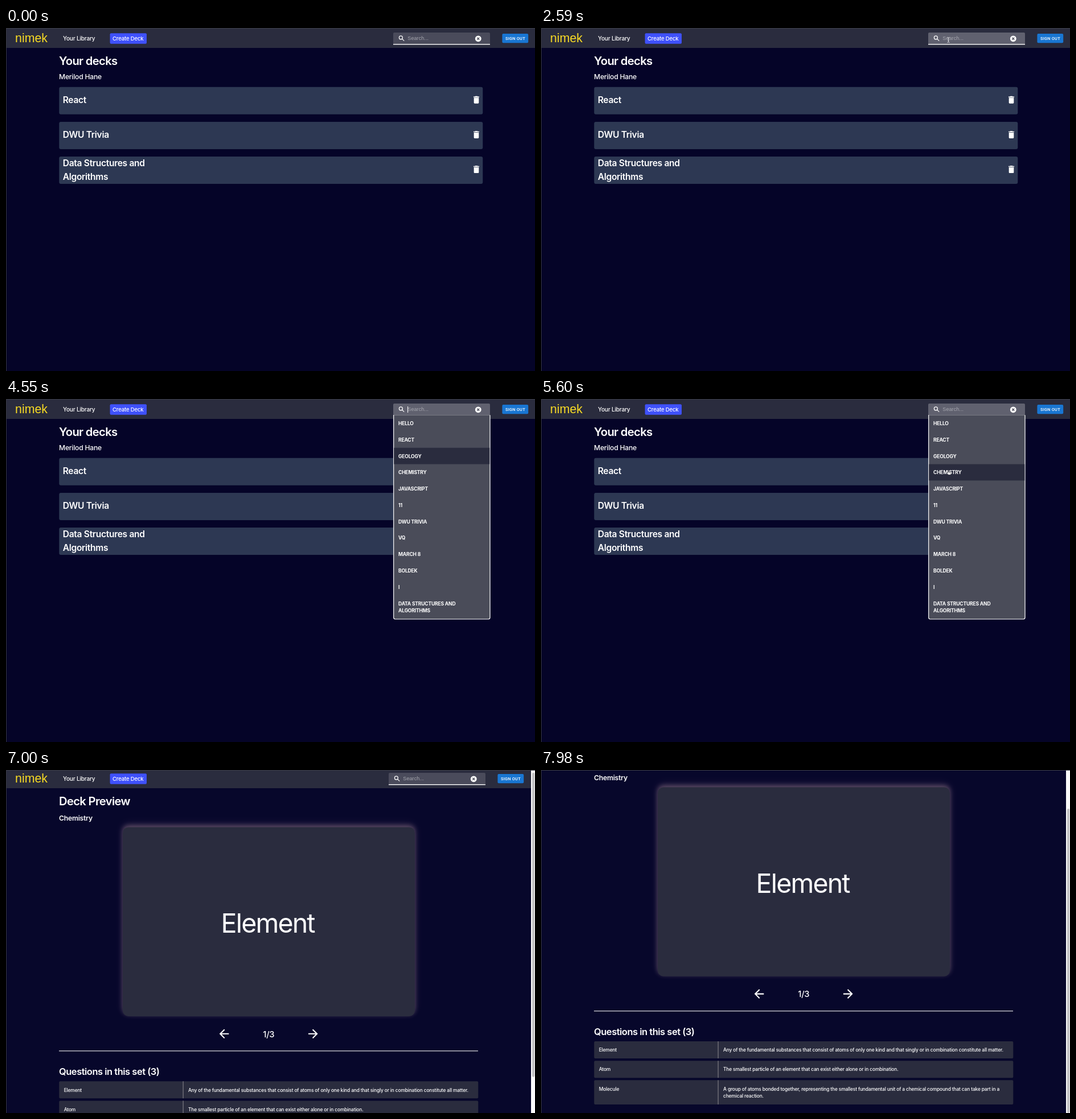
An HTML page that plays this animation: 929 by 603 pixels, repeating every 8 s.

```html
<!DOCTYPE html>
<html lang="en">
<head>
<meta charset="utf-8">
<title>Flashcard decks</title>
<style>
  html, body { margin: 0; width: 100%; height: 100%; overflow: hidden; background: #050428; }
  svg { display: block; width: 100vw; height: 100vh; }
  text {
    font-family: Inter, "Open Sans", sans-serif;
    font-optical-sizing: none;
    letter-spacing: -.02em;
    fill: #fff;
    white-space: pre;
  }
  .title { font-size: 20.3px; font-weight: 600; letter-spacing: -.035em; }
  .sub { font-size: 12.2px; font-weight: 500; }
  .name { font-size: 12.2px; font-weight: 600; }
  .deck { font-size: 15.6px; font-weight: 600; letter-spacing: -.02em; }
  .set { font-size: 16.5px; font-weight: 600; letter-spacing: -.03em; }
  .cell { font-size: 8.44px; font-weight: 500; }
  .item { font-size: 8.55px; font-weight: 700; }
  .face { font-size: 46.6px; letter-spacing: -.04em; }
  .count { font-size: 14.8px; font-weight: 500; text-anchor: middle; }
  .nav { font-size: 10.1px; font-weight: 500; }
  .create { font-size: 9.6px; font-weight: 500; }
  .hint { font-family: "Liberation Sans", Arial, sans-serif; font-size: 9px; letter-spacing: .01em; fill: #a6a7af; }
  .brand { font-family: "Liberation Sans", Arial, sans-serif; font-size: 21.4px; letter-spacing: 0; fill: #f9dc24; }
  .out { font-family: Roboto, sans-serif; font-size: 7.4px; font-weight: 500; letter-spacing: .03em; }
</style>
</head>
<body>
<svg id="stage" viewBox="0 0 929 603" preserveAspectRatio="none">
  <defs>
    <filter id="near" x="-10%" y="-10%" width="120%" height="120%"><feGaussianBlur stdDeviation="4"/></filter>
    <filter id="far" x="-10%" y="-15%" width="120%" height="130%"><feGaussianBlur stdDeviation="8"/></filter>
  </defs>
</svg>
<script>
const LOOP = 8000;
const PANEL = '#2a2c3e';
const stage = document.getElementById('stage');

const rect = (x, y, w, h, fill, r = 0, more = '') =>
  `<rect x="${x}" y="${y}" width="${w}" height="${h}" rx="${r}" fill="${fill}" ${more}/>`;
const label = (x, y, cls, str) => `<text x="${x}" y="${y}" class="${cls}">${str}</text>`;
const icon = (cx, cy, scale, d) =>
  `<path transform="translate(${cx} ${cy}) scale(${scale}) translate(-12 -12)" fill="#fff" d="${d}"/>`;
const group = (id, body) => `<g id="${id}">${body}</g>`;

const TRASH = 'M6 19c0 1.1.9 2 2 2h8c1.1 0 2-.9 2-2V7H6v12zM19 4h-3.5l-1-1h-5l-1 1H5v2h14V4z';
const BACK = 'M20 11H7.83l5.59-5.59L12 4l-8 8 8 8 1.41-1.41L7.83 13H20v-2z';
const NEXT = 'M12 4l-1.41 1.41L16.17 11H4v2h12.17l-5.58 5.59L12 20l8-8z';

const header = () => rect(0, 0, 929, 35, PANEL)
  + label(16, 25, 'brand', 'nimek')
  + label(100, 22, 'nav', 'Your Library')
  + rect(182.6, 9.2, 64.4, 18.6, '#3f51fb', 2)
  + label(187, 21.7, 'create', 'Create Deck')
  + group('tools',
      rect(680, 8, 170, 21, '#fff', 2, 'id="field"')
    + rect(680, 28, 170, 1.4, '#fff')
    + '<g fill="none" stroke="#fff" stroke-width="1.2"><circle cx="693.4" cy="16.9" r="3"/><path d="M695.6 19.1l3.6 3.6"/></g>'
    + label(705.3, 21.2, 'hint', 'Search...')
    + '<circle cx="829.3" cy="18.8" r="5.4" fill="#fff"/>'
    + '<path d="M827.3 16.8l4 4m0-4l-4 4" stroke="#4b4c5b" stroke-width="1.3"/>'
    + rect(871.4, 10, 45.8, 16.2, '#1976d2', 2)
    + label(877, 20.6, 'out', 'SIGN OUT'));

const library = () => {
  const decks = [['React'], ['DWU Trivia'], ['Data Structures and', 'Algorithms']];
  return label(93, 65.3, 'title', 'Your decks')
    + label(93, 89.6, 'sub', 'Merilod Hane')
    + decks.map((lines, i) => {
        const y = 103.7 + 61.2 * i;
        const first = lines.length > 1 ? 16.8 : 28.3;
        return rect(93.3, y, 744, 48, '#2d3853', 3)
          + lines.map((s, k) => label(99.7, y + first + 24 * k, 'deck', s)).join('')
          + icon(826, y + 22.5, .72, TRASH);
      }).join('');
};

const card = (x, y) =>
    rect(x, y - 6, 513, 332, '#8a6a90', 10, 'opacity=".16" filter="url(#far)"')
  + rect(x, y - 3, 513, 332, '#b3909a', 10, 'opacity=".48" filter="url(#near)"')
  + rect(x, y, 513, 332.5, PANEL, 10);

const controls = (cx, y, count) =>
    icon(cx - 78.3, y, 1.04, BACK)
  + icon(cx + 78, y, 1.04, NEXT)
  + label(cx, y + 5.7, 'count', count);

const loading = () => label(93, 65.3, 'title', 'Deck Preview')
  + '<path id="spinner" d="M8 -1A8 8 0 1 0 2 7.7" fill="none" stroke="#fff" stroke-width="2"/>'
  + card(209.3, 96.3)
  + controls(465.4, 458.8, '1/0')
  + rect(93, 488.4, 744, 1.3, '#cfcfd4')
  + label(93, 530.4, 'set', 'Questions in this set (0)')
  + label(93.3, 548, 'cell', '0');

const preview = () => {
  const rows = [
    [550.2, 30, 'Element', 'Any of the fundamental substances that consist of atoms of only one kind and that singly or in combination constitute all matter.'],
    [584.4, 30, 'Atom', 'The smallest particle of an element that can exist either alone or in combination.'],
    [618.5, 42.7, 'Molecule', 'A group of atoms bonded together, representing the smallest fundamental unit of a chemical compound that can take part in a', 'chemical reaction.']
  ];
  return label(93, 65.3, 'title', 'Deck Preview')
    + label(93, 91.6, 'name', 'Chemistry')
    + card(205, 103.4)
    + label(377.6, 289, 'face', 'Element')
    + controls(461.3, 466.8, '1/3')
    + rect(93, 496.2, 736, 1.3, '#cfcfd4')
    + label(93, 538.8, 'set', 'Questions in this set (3)')
    + rows.map(([y, h, term, ...lines]) => rect(93.3, y, 736, h, PANEL, 2)
        + rect(310.6, y, 1, h, '#8f8c90')
        + label(101.7, y + 18.3, 'cell', term)
        + lines.map((s, k) => label(320, y + 18.3 + 12.8 * k, 'cell', s)).join('')).join('');
};

const PITCH = 28.78;
const menu = () => {
  const items = ['HELLO', 'REACT', 'GEOLOGY', 'CHEMISTRY', 'JAVASCRIPT', '11', 'DWU TRIVIA',
    'VQ', 'MARCH 8', 'BOLDEK', 'I', 'DATA STRUCTURES AND'];
  return '<path d="M680.7 28.3V384q0 3 3 3H847q3 0 3-3V28.3" fill="#4a4c59" stroke="#fff" stroke-width="1.2"/>'
    + rect(681.3, 0, 168, PITCH, PANEL, 0, 'id="hover"')
    + items.map((s, i) => label(689, 46 + PITCH * i, 'item', s)).join('')
    + label(689, 375.2, 'item', 'ALGORITHMS');
};

stage.insertAdjacentHTML('beforeend',
    rect(0, 0, 929, 603, '#050428', 0, 'id="back"')
  + group('page', header() + group('library', library()) + group('loading', loading()) + group('preview', preview()))
  + group('menu', menu())
  + rect(705.1, 13, 1, 11, '#fff', 0, 'id="caret"')
  + group('bar', rect(922, 1, 7, 602, '#fafafa') + rect(924, 0, 4.2, 535, '#c1c1c3', 2.1, 'id="thumb"'))
  + '<path id="beam" d="M713.4 16.4q2.1 0 2.1 1.6v6q0 1.6-2.1 1.6M717.6 16.4q-2.1 0-2.1 1.6v6q0 1.6 2.1 1.6M714.4 22.2h2.2" fill="none" stroke="#e2e2e6" stroke-width=".8"/>'
  + '<path id="hand" d="M2.6 .8q.9-.6 1.4.3v2.3l3.3.6q1 .3.8 1.4L7.5 8.3H3.4L.8 5.4q.1-1.1 1.7-.4z" fill="#fff" stroke="#15151f" stroke-width=".6"/>'
  + rect(0, 0, 929, 1, '#3d3f48') + rect(0, 0, 1, 603, '#34353f'));

const el = Object.fromEntries([...stage.querySelectorAll('[id]')].map(n => [n.id, n]));
const show = (node, on) => node.setAttribute('display', on ? 'inline' : 'none');
const within = (t, ...spans) => spans.some(([a, b]) => t >= a && t < b);

// Latest value whose start time has passed.
const stepped = (t, steps) => steps.reduce((v, [at, value]) => t >= at ? value : v, 0);

const OPENED = 5740, LOADED = 5880;

function render(t) {
  const loaded = t >= LOADED;
  const scroll = stepped(t, [[7000, 3], [7070, 21], [7140, 43.6], [7210, 63], [7280, 73.2]]);

  show(el.library, t < OPENED);
  show(el.loading, t >= OPENED && !loaded);
  show(el.preview, loaded);
  show(el.bar, loaded);
  el.back.setAttribute('fill', loaded ? '#07072b' : '#050428');
  el.page.setAttribute('transform', `translate(0 ${-scroll})`);
  el.tools.setAttribute('transform', `translate(${loaded ? -8 : 0} 0)`);
  el.thumb.setAttribute('y', 2 + scroll * .9);
  el.spinner.setAttribute('transform', `translate(102 88) rotate(${(t - OPENED) * 360 / 1400})`);

  el.field.setAttribute('fill-opacity', within(t, [1680, OPENED]) ? .25 : .15);
  show(el.menu, within(t, [3570, OPENED]));
  const row = stepped(t, [[0, -1], [4270, 0], [4410, 1], [4550, 2], [4830, 3]]);
  show(el.hover, row >= 0);
  el.hover.setAttribute('y', 28.2 + PITCH * Math.max(row, 0));

  show(el.caret, within(t, [2030, 2590], [3080, 3570], [4060, 4690], [5180, 5460]));
  show(el.beam, within(t, [2450, 3360], [3570, 4130]));
  show(el.hand, within(t, [5600, 6090], [7770, 7980]));
  el.hand.setAttribute('transform', t < 7000 ? 'translate(712 125)' : 'translate(354 240)');
}

const start = performance.now();
function tick() {
  render((performance.now() - start) % LOOP);
  requestAnimationFrame(tick);
}
tick();
</script>
</body>
</html>
```
